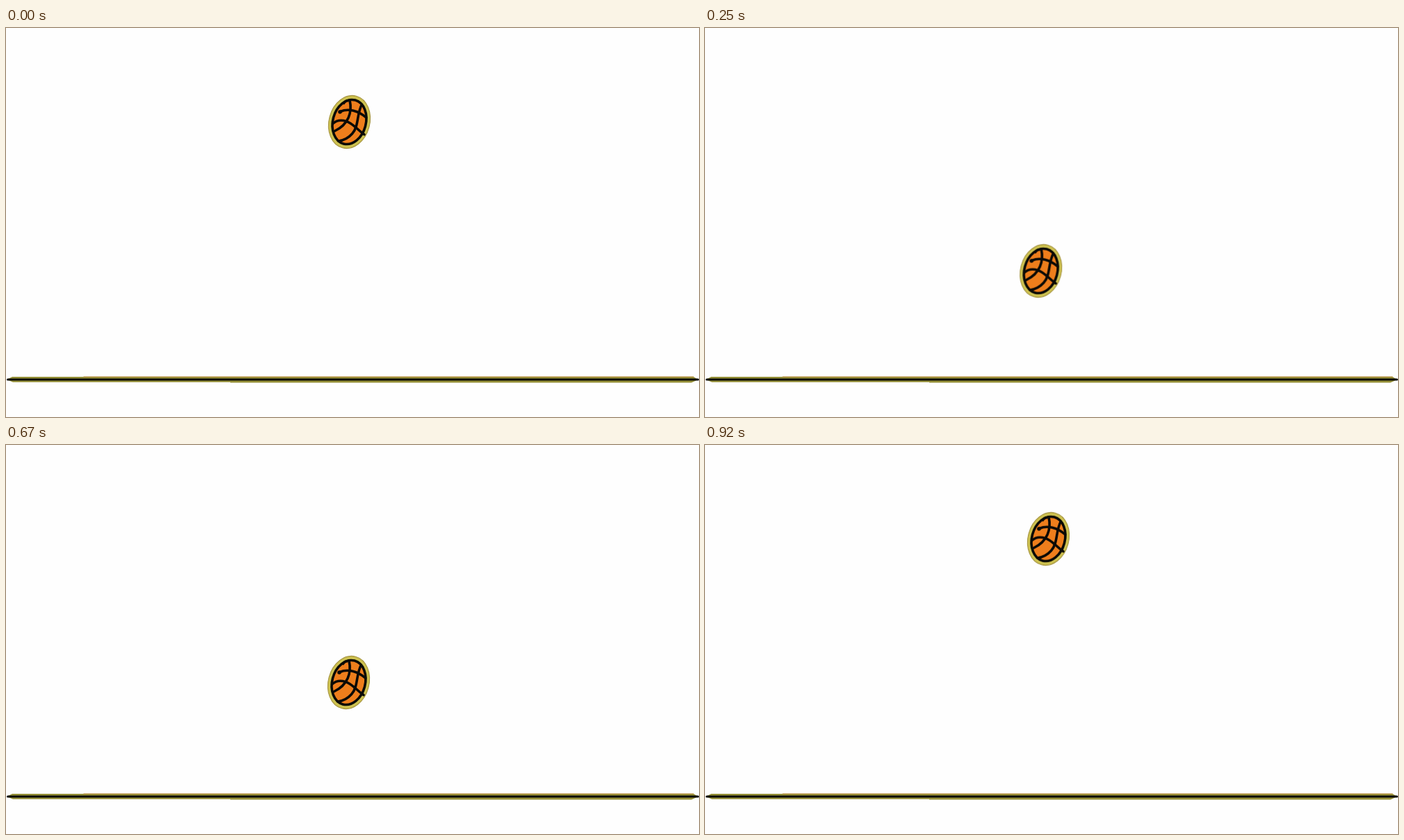
Write an HTML page that moves like this. It is 998x561 px and loops after 1.01 s.

```html
<!DOCTYPE html>
<html lang="en">
<head>
<meta charset="utf-8">
<title>Bouncing ball</title>
<style>
  html, body { margin: 0; width: 100%; height: 100%; overflow: hidden; background: #fefefe; }
  svg { display: block; width: 100vw; height: 100vh; }
  path, .skin { stroke-linecap: round; vector-effect: non-scaling-stroke; }
  .ink { fill: none; stroke: #0b0a06; }
  .glow { fill: #cdc150; stroke: #a3913c; }
  .skin { fill: #ee7e1c; }
  .rim { fill: none; stroke: #b98a38; }
</style>
</head>
<body>
<svg viewBox="0 0 998 561" preserveAspectRatio="none">
  <defs>
    <!-- ball without its glow, centred on the origin -->
    <g id="core" class="ink">
      <ellipse class="skin" rx="23.800" ry="32.500" transform="rotate(15)"/>
      <path d="M-1 -31 Q-6 -31 -8 -27"/>
      <path d="M-13 -15 C-1 -20 13 -16 24 -6.500"/>
      <path d="M.5 -31.500 C4.500 -13.500 -1.500 3.500 -21 13"/>
      <path d="M18 -25.500 C10 -10 14 6 4 17 Q-4 26 -15.500 27.500"/>
      <path d="M-24 2.500 C-17 -4 -7 -3.500 1.500 2 S14.500 13.500 21.500 18"/>
      <circle cx="-13.500" cy="-14.500" r="1"/>
    </g>
  </defs>

  <path fill="#959038" d="M1 507 L9 503 H990 L997 507 L987 511.500 H323 V510.700 H10 Z"/>
  <path class="rim" d="M112 503 H990"/>

  <g id="squash">
    <path class="glow" d="M439 503.500 C449 502 442 483 478 483 S500 502 510 503.500"/>
    <path class="glow" d="M443 511 Q474 516.500 506 511"/>
    <use href="#core" stroke-width="2.500" transform="translate(474.500 497.500) scale(1.030 .300)"/>
  </g>

  <path class="ink" stroke-width="3" d="M2.500 507 H996.500"/>

  <g id="ball">
    <g transform="translate(494.500 135.500)">
      <ellipse class="glow" rx="29.400" ry="38.600" transform="rotate(15)"/>
      <use href="#core" stroke-width="3.600"/>
    </g>
  </g>
</svg>
<script>
  const LOOP = 1010, POSES = 12, HIT = 5;

  // start of a pose: twelve per second, rounded to 10 ms
  const startOf = k => Math.round(k * 100 / POSES) * 10;

  // shift from the top: accelerating fall, then an eased rise
  const fall = k => [-1.2 * k * k, 41 * k + 10.2 * k * k];
  const rise = left => [
    3.17 * left - 1.17 * left * left,
    133 + 170 * Math.sin(0.45 * (left - 2))
  ];
  const shift = k => k < HIT ? fall(k) : rise(POSES - 1 - k);

  const play = (id, pose) => {
    const frames = Array.from({ length: POSES }, (_, k) =>
      ({ offset: startOf(k) / LOOP, easing: "step-end", ...pose(k) }));
    frames.push({ ...frames[POSES - 1], offset: 1 });
    document.getElementById(id).animate(frames, { duration: LOOP, iterations: Infinity });
  };

  play("ball", k => {
    const [x, y] = shift(k);
    return { opacity: +(k !== HIT), transform: `translate(${x}px, ${y}px)` };
  });
  play("squash", k => ({ opacity: +(k === HIT) }));
</script>
</body>
</html>
```
